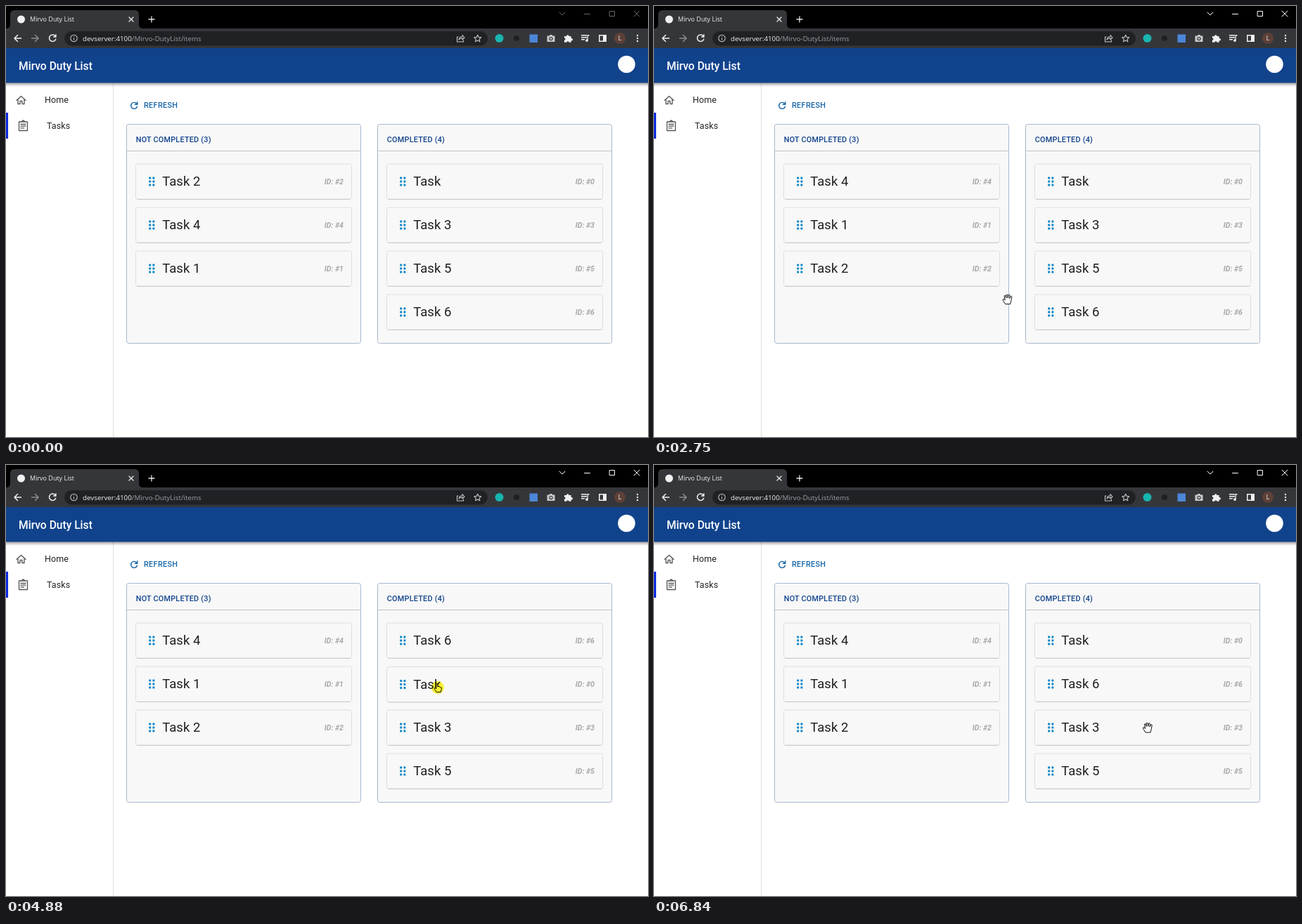
These frames come from a looping animation (913x614 px, 6910 ms). An HTML page:

```html
<!DOCTYPE html>
<html lang="en">
<head>
<meta charset="utf-8">
<title>Task board</title>
<style>
  html, body { margin: 0; width: 100%; height: 100%; overflow: hidden; background: #fff; }
  svg { display: block; width: 100vw; height: 100vh; font-family: Roboto, sans-serif; }
  .ui { font-family: "Open Sans", sans-serif; }
  .line { fill: none; stroke-linecap: round; stroke-linejoin: round; }
  .medium { font-weight: 500; }
  .cardId { font: italic 700 10.6px Roboto, sans-serif; fill: #a9a9a9; }
  #spot { mix-blend-mode: multiply; }
</style>
</head>
<body>
<svg viewBox="0 0 913 614">
  <defs>
    <linearGradient id="barShadow" x2="0" y2="1">
      <stop stop-color="#000" stop-opacity=".38"/>
      <stop offset="1" stop-color="#000" stop-opacity="0"/>
    </linearGradient>
    <radialGradient id="glow">
      <stop offset=".78" stop-color="#fff730"/>
      <stop offset="1" stop-color="#fff730" stop-opacity="0"/>
    </radialGradient>
  </defs>
  <rect width="913" height="614" fill="#fff"/>

  <!-- browser frame -->
  <rect width="913" height="32" fill="#000"/>
  <path d="M0 32q6 0 6-6V12q0-6 6-6H183q6 0 6 6V26q0 6 6 6H913V60.5H0Z" fill="#35363a"/>
  <circle cx="21.500" cy="19" r="5.500" fill="#f1f1f1"/>
  <text class="ui" x="34" y="22.300" font-size="9" fill="#f1f1f1">Mirvo Duty List</text>
  <path class="line" d="M175 16l6 6m0-6l-6 6M203 19h8m-4-4v8" stroke="#e8e8e8" stroke-width="1.300"/>
  <path id="windowButtons" class="line" d="M787 9l4 4 4-4M822.5 11.5h8M858.5 7.5h7v7h-7zM893 7l8 8m0-8l-8 8"/>
  <rect x="83" y="36" width="602" height="20.500" rx="10.200" fill="#202124"/>
  <g class="line" stroke="#f1f1f1" stroke-width="1.500">
    <path d="M21.500 46H12m4.500-4.500L12 46l4.500 4.500"/>
    <path d="M36.500 46H46m-4.500-4.500L46 46l-4.500 4.500" stroke="#8b8c8f"/>
    <path d="M70.300 43.300A4.700 4.700 0 1 0 70.700 47.200M70.900 41v3h-3.200"/>
  </g>
  <g class="line" stroke="#c4c6c9" stroke-width="1.100">
    <circle cx="96.500" cy="46" r="4.700"/>
    <path d="M96.500 45.700v2.600m0-4.800v.1"/>
    <path d="M643 44h-1.500v7h9v-2M644 48q.5-4 5-4.200V41.500l3 3.500-3 3v-2.200q-3 0-5 2.200z"/>
    <path d="M670.700 41.200l1.500 3.200 3.500.4-2.600 2.400.7 3.500-3.100-1.700-3.100 1.700.7-3.500-2.600-2.400 3.500-.4z"/>
  </g>
  <text class="ui" x="109" y="49.600" font-size="9.800" fill="#9aa0a6"><tspan fill="#f1f1f1">devserver:4100</tspan>/Mirvo-DutyList/items</text>
  <circle cx="701.500" cy="46" r="6" fill="#17b5ae"/>
  <circle cx="726" cy="46" r="4" fill="#1f2023"/>
  <rect x="744.500" y="40.500" width="11.500" height="11.500" fill="#4a86d8"/>
  <g fill="#c9cacc">
    <path d="M769.500 42.500h3l1-1.500h3l1 1.500h3v8.500h-11z"/>
    <circle cx="775" cy="46.600" r="2.700" fill="#35363a"/><circle cx="775" cy="46.600" r="1.500"/>
  </g>
  <g fill="#f1f1f1">
    <path d="M794 43h3a1.800 1.800 0 1 1 3.600 0h3v3a1.800 1.800 0 1 1 0 3.400v2.400h-3a1.600 1.600 0 0 0-3.300 0H794v-3.200a1.600 1.600 0 0 0 0-3.200z"/>
    <path d="M818 41h8v1.400h-8zm0 3h8v1.400h-8zm0 3h5v1.400h-5zM826.500 41h3v1.500h-1.700v6.700a1.900 1.900 0 1 1-1.300-1.800z"/>
    <path d="M843 41h11v10h-11zm1.500 1.500v7h4.500v-7z" fill-rule="evenodd"/>
    <circle cx="898" cy="42" r="1.200"/><circle cx="898" cy="46" r="1.200"/><circle cx="898" cy="50" r="1.200"/>
  </g>
  <circle cx="873" cy="46" r="8" fill="#5d4037"/>
  <text x="873" y="49" font-size="8.500" fill="#eee" text-anchor="middle">L</text>

  <!-- app frame -->
  <path d="M152.500 109V614" stroke="#e0e0e0"/>
  <rect y="109" width="913" height="6" fill="url(#barShadow)"/>
  <rect y="60" width="913" height="49.500" fill="#11438c"/>
  <text class="medium" x="18" y="90.500" font-size="15.600" fill="#fff">Mirvo Duty List</text>
  <circle cx="882.500" cy="83" r="12.300" fill="#fff"/>
  <rect y="152" width="3" height="37" fill="#0a2be0"/>
  <g class="line" stroke="#555" stroke-width="1.300">
    <path d="M15 134.500l6.500-6 6.500 6M17 133v6.500h3v-4h3v4h3V133"/>
    <path d="M18.500 165h12v12.500h-12zM22.500 164.500q2-3 4 0M21 168.500h7m-7 2.700h7m-7 2.700h4.500"/>
  </g>
  <g font-size="12.500" letter-spacing=".1" fill="#222">
    <text x="55" y="138">Home</text><text x="58" y="175">Tasks</text>
  </g>
  <path class="line" d="M185.800 139.200A4.500 4.500 0 1 0 186.500 143.200M186.800 136.800v3.400h-3.500" stroke="#1565a8" stroke-width="1.400"/>
  <text class="medium" x="196" y="145" font-size="10.900" letter-spacing=".31" fill="#1565a8">REFRESH</text>
  <g id="columns"></g>
  <g id="cards"></g>
  <g id="cursor" fill="#fff" stroke="#111" stroke-linejoin="round">
    <path id="arrow" d="M-6-9V6.500L-2.500 3.300.3 9 2.600 8 0 2.300H5z"/>
    <path id="open" d="M-3 7L-6.500 1.500Q-7-.5-5 0L-3.500 1.500-4.500-4Q-4.300-6-2.800-5L-1.800-1.500V-6Q-1-7.600.2-6L.6-1.600 1.500-6Q3-7 3.400-5.500L3-1 4.600-4Q6.200-4.800 6.200-3L5 3Q4.500 5 4 7Z"/>
    <path id="fist" d="M-3 5.500L-5.300 1.500Q-5.800-.8-4.300-.8L-4-3Q-3-5-1.500-3.800 0-5.500 1.300-3.800 3-4.800 3.700-3 5.500-3 5.300-1 5.300 2 3.800 5.500Z"/>
    <path id="point" d="M-1.800 6.500L-5 1.800Q-5.300 0-3.600.5L-2.200 2V-5Q-1.200-7-.2-5V-1.300Q1-2.500 2-1 3.200-1.800 3.900-.3 5.400-.6 5.400 1L4.300 6.500Z"/>
    <circle id="spot" r="10" fill="url(#glow)" stroke="none"/>
  </g>
</svg>
<script>
const LOOP = 6910, STEP = 70, SETTLE = 200;
const TOP = 225, PITCH = 62, SWAP = 0.62 * PITCH;
const $ = id => document.getElementById(id);

const columns = [
  { x: 171.5, label: 'NOT COMPLETED (3)', order: [2, 4, 1] },
  { x: 528.5, label: 'COMPLETED (4)', order: [0, 3, 5, 6] }
];
const drags = [
  { id: 2, down: 940, start: 1200, end: 2430, grip: [178.5, 39], pose: 'fist' },
  { id: 6, down: 2990, start: 3200, end: 4400, grip: [57.5, 19], pose: 'fist' },
  { id: 0, down: 4730, start: 4800, end: 6600, grip: [72.5, 29.5], pose: 'point' }
];
// Pointer key points: time, x, y
const path = [
  [190, 797, 519], [750, 362, 257], [1140, 362, 258], [2120, 365, 360], [2430, 364, 388],
  [2970, 598, 438], [3200, 599, 430], [3480, 604, 375], [4040, 595, 267], [4310, 592, 229],
  [4460, 594, 242], [4740, 614, 317], [4880, 614, 317], [5275, 618, 418], [5440, 621, 437],
  [5650, 629, 452], [5860, 629, 430], [6550, 616, 242], [6610, 616, 242], [6840, 702, 374]
];

const mix = (a, b, p) => a + (b - a) * p;
const ease = p => 1 - (1 - Math.min(1, Math.max(0, p))) ** 2.3;
const slotY = slot => TOP + PITCH * slot;

function pointer(t) {
  const next = Math.max(1, path.findIndex(p => p[0] > t));
  const [a, b] = t < LOOP - STEP ? [path[next - 1], path[next]] : path.slice(-2);
  const p = Math.min(1, Math.max(0, (t - a[0]) / (b[0] - a[0])));
  return [mix(a[1], b[1], p), mix(a[2], b[2], p)];
}

function heldAt(drag, t) {
  const [x, y] = pointer(t);
  return [x - drag.grip[0], y - drag.grip[1]];
}

const cards = columns.flatMap(col => col.order.map((id, slot) =>
  ({ id, x: col.x + 13, moves: [{ time: 0, slot }] })));

// A held card trades places with a neighbour once it is far enough from its own slot.
function planMoves() {
  for (const drag of drags) {
    const { order } = columns.find(col => col.order.includes(drag.id));
    for (let time = drag.start; time < drag.end; time += 5) {
      const slot = order.indexOf(drag.id);
      const shift = heldAt(drag, time)[1] - slotY(slot);
      const other = slot + Math.sign(shift);
      if (Math.abs(shift) < SWAP || !(other in order)) continue;
      [order[slot], order[other]] = [order[other], order[slot]];
      for (const s of [slot, other]) {
        cards.find(c => c.id === order[s]).moves.push({ time, slot: s });
      }
    }
  }
}

function place(card, t) {
  const past = card.moves.filter(m => m.time <= t);
  const now = past[past.length - 1], before = past[past.length - 2] || now;
  const drag = drags.find(d => d.id === card.id && t >= d.start && t < d.end + SETTLE);
  if (!drag) {
    return [card.x, mix(slotY(before.slot), slotY(now.slot), ease((t - now.time) / SETTLE))];
  }
  const [x, y] = heldAt(drag, Math.min(t, drag.end));
  const p = ease((t - drag.end) / SETTLE);
  return [mix(x, card.x, p), mix(y, slotY(now.slot), p)];
}

const columnMarkup = ({ x, label }) => `
  <rect x="${x}" y="168.5" width="333" height="312" rx="3" fill="#f8f8f8" stroke="#a9b7d0"/>
  <path d="M${x} 206.5h333" stroke="#bfc3ca"/>
  <text class="medium" x="${x + 13.3}" y="194" font-size="10.9" letter-spacing=".2" fill="#11438c">${label}</text>`;

const dots = Array.from({ length: 6 }, (_, i) =>
  `<circle cx="${20.2 + i % 2 * 5.2}" cy="${20 + (i >> 1) * 5}" r="1.7"/>`).join('');

const cardMarkup = ({ id }) => `<g id="card${id}">
  <rect width="307" height="50" rx="2.5" fill="none" stroke="#dedede"/>
  <path d="M2 50.5h303" stroke="#cbcbcb"/>
  <g fill="#0f88c9">${dots}</g>
  <text x="37.7" y="31.4" font-size="18.6" fill="#202124">Task ${id || ''}</text>
  <text class="cardId" x="295.5" y="28.8" text-anchor="end">ID: #${id}</text></g>`;

$('columns').innerHTML = columns.map(columnMarkup).join('');
$('cards').innerHTML = cards.map(cardMarkup).join('');
planMoves();

// The picture advances in steps, with a slightly shifted beat in the first drag.
function step(time) {
  const phase = time > 900 && time < 3000 ? 20 : 50;
  return Math.max(0, phase + Math.floor((time - phase) / STEP) * STEP);
}

function draw(time) {
  const t = step(time);
  for (const card of cards) {
    $('card' + card.id).setAttribute('transform', `translate(${place(card, t)})`);
  }
  const [x, y] = pointer(t);
  const press = drags.find(d => t >= d.down && t < d.end);
  const pose = press && t >= press.start ? press.pose : y > 490 ? 'arrow' : 'open';
  for (const id of ['arrow', 'open', 'fist', 'point']) {
    $(id).setAttribute('visibility', t >= path[0][0] && id === pose ? 'visible' : 'hidden');
  }
  $('spot').setAttribute('visibility', press ? 'visible' : 'hidden');
  $('cursor').setAttribute('transform', `translate(${x} ${y})`);
  $('windowButtons').setAttribute('stroke', t >= 1000 ? '#fff' : '#666');
}

const began = performance.now();
function tick() {
  draw((performance.now() - began) % LOOP);
  requestAnimationFrame(tick);
}
tick();
</script>
</body>
</html>
```
